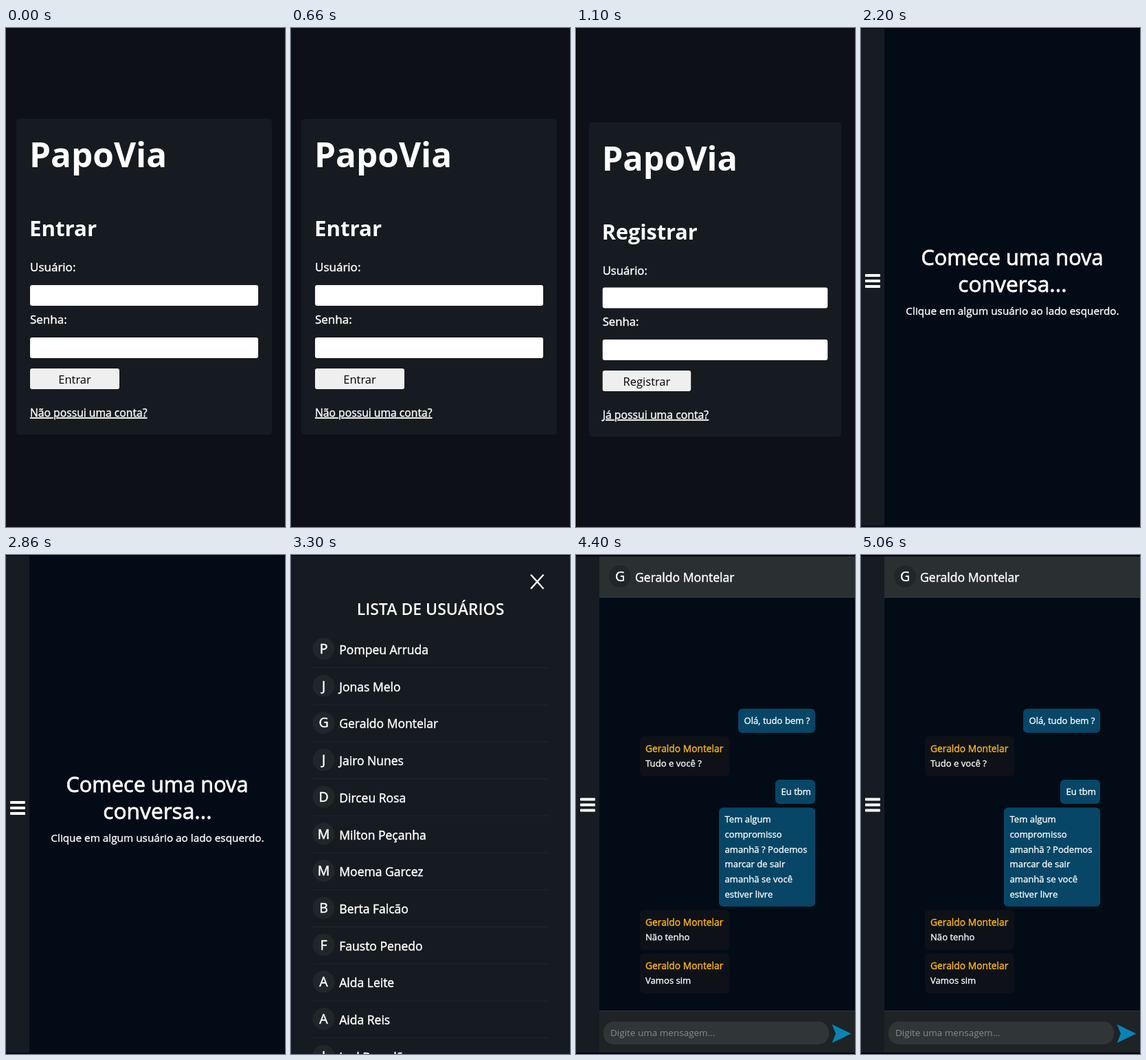
These frames come from a looping animation (406x724 px, 5500 ms). An HTML page:

```html
<!DOCTYPE html>
<html lang="pt-BR">
<head>
<meta charset="utf-8">
<title>Chat</title>
<style>
  html, body { margin: 0; width: 100%; height: 100%; overflow: hidden; background: #0d1117; }
  svg { display: block; width: 406px; height: 724px; }
  text { font-family: "Open Sans", "Noto Sans", sans-serif; font-weight: 400; white-space: pre; }
  /* A hairline outline gives regular text a medium weight. */
  .medium { stroke: currentColor; stroke-width: .025em; }
  .semi { font-weight: 600; }
  .bold { font-weight: 700; }
  .link { text-decoration: underline; }
</style>
</head>
<body>
<svg id="stage" viewBox="0 0 406 724" xmlns="http://www.w3.org/2000/svg"></svg>
<script>
const STEP = 1100;
const stage = document.getElementById("stage");
const PANEL = "#161b21", NIGHT = "#030c16", SIDE = "#171c22", CHIP = "#21262b";

const rect = (x, y, w, h, fill, r = 0) =>
  `<rect x="${x}" y="${y}" width="${w}" height="${h}" rx="${r}" fill="${fill}"/>`;

const text = (x, y, size, str, { fill = "#fff", anchor = "start", look = "medium" } = {}) =>
  `<text x="${x}" y="${y}" font-size="${size}" fill="${fill}" color="${fill}"
    text-anchor="${anchor}" class="${look}">${str}</text>`;

const centered = (x, y, size, str, opts = {}) => text(x, y, size, str, { ...opts, anchor: "middle" });

const avatar = (x, y, name) =>
  `<circle cx="${x}" cy="${y}" r="16" fill="${CHIP}"/>` + centered(x, y + 7, 19.5, name[0]);

const menu = y => [-10, -2, 6].map(d => rect(6, y + d, 22, 4, "#fff", 1)).join("");

// Sign-in and sign-up share one card layout.
function form(f) {
  const { x, w } = f;
  const field = y => rect(x, y, w, 30, "#fff", 3);
  return rect(0, 0, 406, 724, "#0d1117") +
    rect(x - 20, f.top, w + 40, f.height, PANEL, 5) +
    text(x - 1, f.title, f.titleSize, "PapoVia", { look: "bold" }) +
    text(x - 1, f.title + 100, f.headSize, f.action, { look: "bold" }) +
    text(x, f.user, f.label, "Usuário:") + field(f.inputs[0]) +
    text(x, f.pass, f.label, "Senha:") + field(f.inputs[1]) +
    rect(x, f.button, f.buttonW, 30, "#efefef", 3) +
    centered(x + f.buttonW / 2, f.button + 22, 16.5, f.action, { fill: "#000", look: "plain" }) +
    text(x, f.link, f.linkSize, f.question, { look: "medium link" });
}

const signIn = form({
  x: 35, w: 332, top: 132, height: 458, title: 202, titleSize: 49.5, headSize: 31.2,
  action: "Entrar", user: 353, pass: 429, label: 17, inputs: [373, 449],
  button: 494, buttonW: 130, link: 564, linkSize: 15.7, question: "Não possui uma conta?"
});

const signUp = form({
  x: 38.7, w: 327.5, top: 137, height: 456, title: 207, titleSize: 48.8, headSize: 30.6,
  action: "Registrar", user: 358, pass: 432, label: 16.7, inputs: [376.5, 452],
  button: 497, buttonW: 128.5, link: 567, linkSize: 15.8, question: "Já possui uma conta?"
}) + rect(0, 0, 1, 724, "#000");

const welcome = rect(0, 0, 406, 724, NIGHT) + rect(0, 0, 34, 722, SIDE) +
  rect(0, 0, 406, 1, "#000") + menu(367) +
  centered(220, 344, 30.7, "Comece uma nova") +
  centered(220.5, 383, 31.7, "conversa...") +
  centered(220.5, 416, 15.3, "Clique em algum usuário ao lado esquerdo.");

const users = ["Pompeu Arruda", "Jonas Melo", "Geraldo Montelar", "Jairo Nunes", "Dirceu Rosa",
  "Milton Peçanha", "Moema Garcez", "Berta Falcão", "Fausto Penedo", "Alda Leite", "Aida Reis", "Joel Brandão"];

const list = rect(0, 0, 406, 724, PANEL) + rect(0, 0, 406, 1, "#000") +
  `<path d="M349 28.500L367.500 49M367.500 28.500L349 49" stroke="#fff" stroke-width="2.4"/>` +
  centered(203, 87, 23, "LISTA DE USUÁRIOS", { look: "semi" }) +
  users.map((name, i) => {
    const y = 53.7 * i;
    return avatar(47.5, 136 + y, name) + text(70.3, 144 + y, 17.5, name) +
      rect(31, 163 + y, 343, 1, CHIP);
  }).join("");

const friend = users[2];

function sent(x, y, h, lines) {
  return rect(x, y, 348 - x, h, "#074666", 6) +
    lines.map((s, i) => text(x + 8.5, y + 21.7 * (i + 1), 13.1, s)).join("");
}

function received(y, str) {
  return rect(93, y, 130, 58, "#0e1117", 6) +
    text(101, y + 23, 13.8, friend, { fill: "#ffb90f" }) +
    text(101, y + 44, 13.1, str);
}

const chat = rect(0, 0, 406, 724, NIGHT) + rect(0, 0, 34, 722, SIDE) +
  rect(34, 0, 372, 62, "#2a2f31") + rect(34, 61, 372, 1, "#363b3d") +
  avatar(64, 31, friend) + text(86, 38.5, 17.6, friend) + menu(362.5) +
  sent(236, 223, 35, ["Olá, tudo bem ?"]) +
  received(263, "Tudo e você ?") +
  sent(290, 326, 35, ["Eu tbm"]) +
  sent(208, 366.5, 143.5, ["Tem algum", "compromisso", "amanhã ? Podemos", "marcar de sair", "amanhã se você", "estiver livre"]) +
  received(515, "Não tenho") +
  received(578, "Vamos sim") +
  rect(34, 661, 372, 61, "#1e2326") + rect(34, 661, 372, 1, "#303538") +
  rect(40, 677, 328, 33, "#303638", 15) +
  text(50, 698, 13.5, "Digite uma mensagem...", { fill: "#878b8d", look: "plain" }) +
  `<path d="M372.500 681L400.500 694.500L372.500 708L378 694.500Z" fill="#0983b5"/>` +
  rect(0, 0, 406, 2, "#000") + rect(0, 722, 406, 2, "#000");

const scenes = [signIn, signUp, welcome, list, chat];
stage.innerHTML = scenes.map((s, i) => `<g visibility="${i ? "hidden" : "visible"}">${s}</g>`).join("");
const groups = [...stage.children];
const start = performance.now();

function draw(now) {
  const current = Math.floor(Math.max(0, now - start) / STEP) % groups.length;
  groups.forEach((g, i) => g.setAttribute("visibility", i === current ? "visible" : "hidden"));
  requestAnimationFrame(draw);
}
requestAnimationFrame(draw);
</script>
</body>
</html>
```
